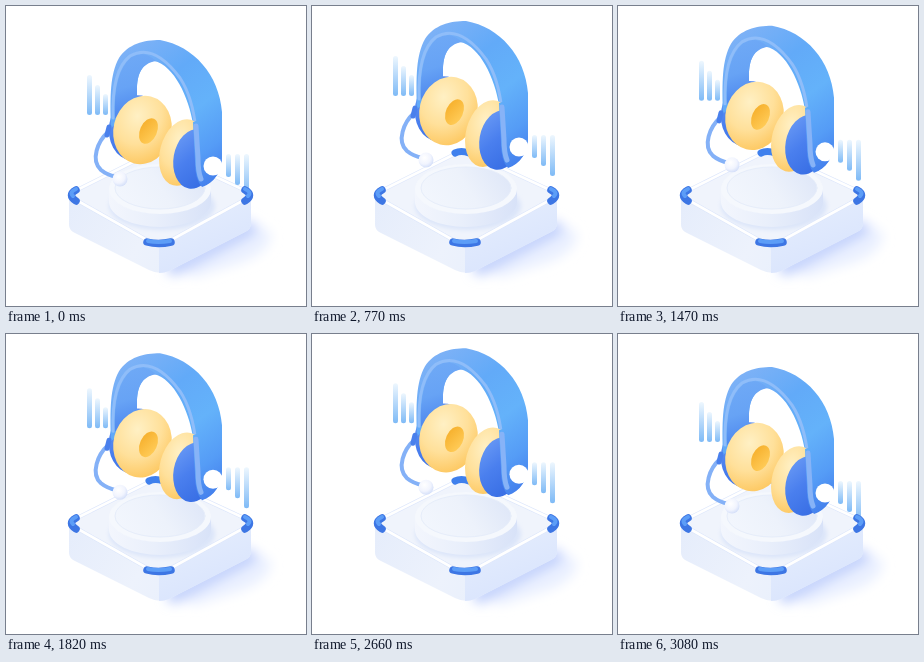
An HTML page for the animation above (3.15 s loop, 300x300 px).

```html
<!DOCTYPE html>
<html lang="en">
<head>
<meta charset="utf-8">
<style>
html, body { margin: 0; width: 100%; height: 100%; overflow: hidden; background: #fff; }
svg { display: block; width: 100vw; height: 100vh; }
</style>
</head>
<body>
<svg viewBox="0 0 300 300" fill="none" stroke-linecap="round" stroke-linejoin="round">
<defs>
  <linearGradient id="band" gradientUnits="userSpaceOnUse" x1="112" y1="45" x2="215" y2="180">
    <stop stop-color="#7fb2f6"/><stop offset=".3" stop-color="#62aaf8"/>
    <stop offset=".55" stop-color="#64b2fa"/><stop offset=".78" stop-color="#559cf6"/><stop offset="1" stop-color="#3f78ea"/>
  </linearGradient>
  <linearGradient id="inner" x1="0" y1="0" x2=".2" y2="1">
    <stop stop-color="#70aaf6"/><stop offset=".55" stop-color="#67a3f5"/><stop offset="1" stop-color="#4d87ee"/>
  </linearGradient>
  <linearGradient id="cup" x1="0" y1="0" x2=".8" y2="1">
    <stop stop-color="#6f9ff6"/><stop offset=".5" stop-color="#4a7fee"/><stop offset="1" stop-color="#366ce3"/>
  </linearGradient>
  <radialGradient id="pad" cx=".36" cy=".32" r=".75">
    <stop stop-color="#fff0c4"/><stop offset=".55" stop-color="#ffe09a"/><stop offset="1" stop-color="#fdc75f"/>
  </radialGradient>
  <linearGradient id="hole" x1="0" y1="0" x2="1" y2=".6">
    <stop stop-color="#f5ad28"/><stop offset="1" stop-color="#ffca55"/>
  </linearGradient>
  <linearGradient id="bar" x1="0" y1="0" x2="0" y2="1">
    <stop stop-color="#eef7fe"/><stop offset="1" stop-color="#7ebaf6"/>
  </linearGradient>
  <linearGradient id="left" x1="0" y1="0" x2="1" y2=".4">
    <stop stop-color="#e3ebfb"/><stop offset=".6" stop-color="#edf2fc"/><stop offset="1" stop-color="#e6eefc"/>
  </linearGradient>
  <linearGradient id="right" x1="0" y1="0" x2=".5" y2="1">
    <stop stop-color="#e7effd"/><stop offset="1" stop-color="#d9e4fd"/>
  </linearGradient>
  <linearGradient id="side">
    <stop stop-color="#f3f6fd"/><stop offset=".45" stop-color="#e9effb"/><stop offset="1" stop-color="#d8e2f8"/>
  </linearGradient>
  <linearGradient id="disc" x1="0" y1=".6" x2="1" y2=".3">
    <stop stop-color="#f2f6fd"/><stop offset=".5" stop-color="#edf2fb"/><stop offset="1" stop-color="#dfe7f8"/>
  </linearGradient>
  <radialGradient id="ball" cx=".4" cy=".35" r=".7">
    <stop stop-color="#fff"/><stop offset=".6" stop-color="#f1f4fe"/><stop offset="1" stop-color="#d0dcf8"/>
  </radialGradient>
  <filter id="blur" x="-50%" y="-50%" width="200%" height="200%"><feGaussianBlur stdDeviation="6"/></filter>
  <filter id="soft" x="-50%" y="-50%" width="200%" height="200%"><feGaussianBlur stdDeviation="2"/></filter>
</defs>

<!-- base -->
<g filter="url(#blur)">
  <path d="M160 262 L240 212 L264 226 Q268 242 240 255 L190 271Z" fill="#eaf0ff"/>
  <path d="M168 262 L243 223" stroke="#c3d2fc" stroke-width="15"/>
</g>
<path d="M63 191 Q63 187 68 185 L144 146 Q151 143 158 146 L240 186 Q245 188 245 193 L245 218 Q245 223 239 226 L163 265 Q153 269 143 264 L69 227 Q63 224 63 219Z" fill="url(#left)"/>
<path d="M153 238 L245 191 V218 Q245 223 239 226 L163 265 Q158 267 153 267Z" fill="url(#right)"/>
<path d="M153 242 V264" stroke="#f2f6ff" stroke-width="9" filter="url(#soft)"/>
<path d="M68 186 L144 147 Q151 144 158 147 L240 186 Q245 190 239 194 L162 234 Q153 238 144 233 L68 195 Q62 190 68 186Z" fill="#f0f4fc"/>

<!-- pedestal -->
<ellipse cx="156" cy="200" rx="53" ry="24" fill="#dbe5f9" filter="url(#soft)"/>
<path d="M103 183 V196 A51 25 0 0 0 205 196 V183Z" fill="url(#side)"/>
<ellipse cx="154" cy="183" rx="51" ry="25" fill="#f5f8fd"/>
<ellipse cx="154" cy="182" rx="45" ry="21" fill="url(#disc)" stroke="#e6edfa"/>

<!-- rope -->
<g>
  <path d="M71 184 L143 148 M158 147 L238 184 M72 195 L141 234 M165 234 L238 194" stroke="#dce6fb" stroke-width="4"/>
  <path d="M71 184 L143 148 M158 147 L238 184 M72 195 L141 234 M165 234 L238 194" stroke="#fff" stroke-width="2.6"/>
</g>
<path d="M143 147 Q149 144 157 147" stroke="#3f80ed" stroke-width="7"/>

<g id="phones">
  <g id="bars" fill="url(#bar)"></g>
  <ellipse cx="130" cy="122" rx="27" ry="33" transform="rotate(10 130 122)" fill="url(#cup)"/>
  <path d="M105 122 C104 90 104 68 113 52 C122 38 138 34 154 34 C188 40 213 69 216 106 L216 150 C216 165 208 176 197 180 L190 152 L187 118 C183 92 168 59 148 55 C136 57 131 68 131 84 V100Z" fill="url(#band)"/>
  <path d="M109 112 C108 82 113 60 127 50 C134 46 143 48 150 55 C136 57 131 68 131 84 V104Z" fill="url(#inner)"/>
  <path d="M107 112 C106 80 111 60 124 50 C143 39 160 53 174 72 C184 87 188 105 190 124" stroke="#8fbdf9" stroke-width="3"/>
  <path d="M102 126 C92 135 84 154 95 164 Q101 169 111 171" stroke="#84b1f7" stroke-width="4"/>
  <path d="M103 121 L101 129" stroke="#4a80ec" stroke-width="5"/>
  <ellipse cx="136.500" cy="124" rx="29" ry="34.500" transform="rotate(14 136.500 124)" fill="url(#pad)"/>
  <ellipse cx="142.500" cy="125" rx="8.500" ry="13.500" transform="rotate(24 142.500 125)" fill="url(#hole)"/>
  <ellipse cx="176" cy="146.500" rx="22" ry="34" transform="rotate(15 176 146.500)" fill="url(#pad)"/>
  <ellipse cx="188" cy="153" rx="20.500" ry="30" transform="rotate(10 188 153)" fill="url(#cup)"/>
  <path d="M187 116 L216 106 V150 C216 166 208 177 196 181 Q189 174 189 155Z" fill="url(#band)"/>
  <path d="M190 120 L192 152 Q192 166 195 173" stroke="#87b3f7" stroke-width="5"/>
  <circle cx="207" cy="160" r="9.500" fill="#fff"/>
  <circle cx="114" cy="173" r="7.500" fill="url(#ball)"/>
</g>

<!-- corner grips -->
<path d="M70 184 Q61 189 70 195 M141 236 Q152 239 165 236 M239 184 Q248 189 239 195" stroke="#3d76e4" stroke-width="7.500"/>
<path d="M70 183 Q63 186 67 190 M142 235 Q152 237 164 235 M239 183 Q246 186 242 190" stroke="#5c9df7" stroke-width="4"/>
</svg>

<script>
const phones = document.getElementById("phones");
const LOOP = 3150, STEP = 70;
const PEAK = 500, HIGH = -19.8, REST = -14;

// x, top, bottom
const bars = [
  [81, 69, 109], [89, 79, 109], [97, 88, 109],
  [220, 148, 171], [229, 148, 179], [238, 148, 189]
];
document.getElementById("bars").innerHTML = bars.map(([x, top, end]) =>
  `<rect x="${x}" y="${top}" width="5" height="${end - top}" rx="2.500"/>`).join("");

const ease = (from, to, p) => from + (to - from) * (1 - Math.cos(Math.PI * p)) / 2;

// Quick lift, slow sag to mid-loop, then the same in reverse.
function offset(time) {
  const t = Math.min(time, LOOP - time);
  return t < PEAK ? ease(0, HIGH, t / PEAK)
    : ease(HIGH, REST, (t - PEAK) / (LOOP / 2 - PEAK));
}

function draw() {
  const t = Math.floor(performance.now() % LOOP / STEP) * STEP;
  phones.setAttribute("transform", `translate(0 ${offset(t).toFixed(2)})`);
  requestAnimationFrame(draw);
}
draw();
</script>
</body>
</html>
```
